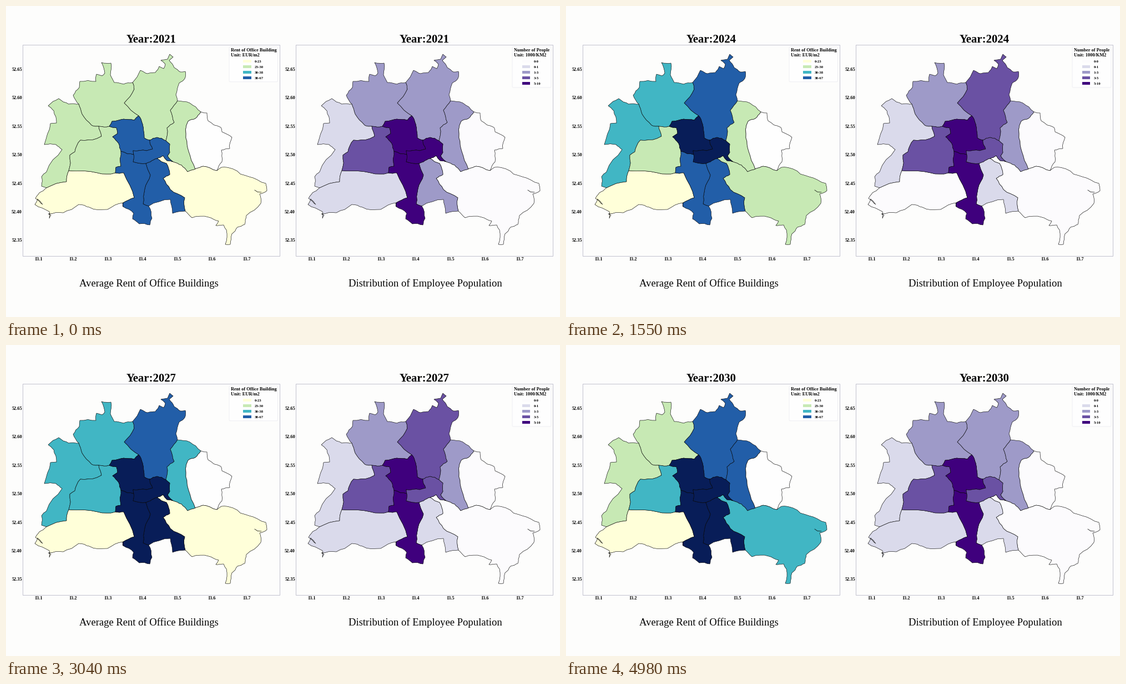
A matplotlib script for the animation above (5.01 s loop, 998 px wide and 561 px high).

```python
import random

import matplotlib.pyplot as plt
from matplotlib.animation import FuncAnimation
from matplotlib.patches import FancyBboxPatch, Polygon, Rectangle

W, H, DPI = 998, 561, 64
PT = 72 / DPI                      # points per pixel
FRAMES, INTERVAL = 167, 30
FIRST_YEAR, YEARS = 2021, 10
PAPER, BLANK = "#fdfdfc", "#fefefe"
RENT_COLORS = ["#ffffd9", "#c7e9b4", "#41b6c4", "#225ea8", "#081d58"]
JOB_COLORS = ["#fcfbfd", "#dadaeb", "#9e9ac8", "#6a51a3", "#3f007d"]

plt.rcParams["font.family"] = "Liberation Serif"
rng = random.Random(4)


def roughen(points, amount=0.08):
    """Push the middle of each longer segment a little to the side."""
    out = [points[0]]
    for (x0, y0), (x1, y1) in zip(points, points[1:]):
        dx, dy = x1 - x0, y1 - y0
        if dx * dx + dy * dy > 36:
            k = rng.uniform(-amount, amount)
            out.append(((x0 + x1) / 2 - k * dy, (y0 + y1) / 2 + k * dx))
        out.append((x1, y1))
    return out


def arc(start, end, *keys):
    """Natural-looking border between two junctions through a few key points."""
    return roughen(roughen([start, *keys, end]))


def ring(first, *arcs):
    """Join borders end to end, flipping them where needed."""
    points = list(first)
    for a in arcs:
        points += a if a[0] == points[-1] else a[::-1]
    return points


# Junctions, named by the areas that meet there
W_N, N_NE, NE_E, E_FE = (131, 177), (228, 138), (309, 171), (351, 191)
FE_SE, SE_SSE, SSE_S, S_SW, SW_W = (380, 297), (323, 370), (257, 361), (211, 362), (73, 328)
N_W_MW, N_MW_C, N_NE_C = (167, 217), (186, 217), (239, 198)
C_NE_ME, NE_E_ME, ME_E_SE = (259, 242), (288, 243), (301, 281)
E_FE_SE, ME_SE_SSE, ME_SSE_S = (341, 294), (272, 275), (252, 284)
ME_S_C, MW_S_C, MW_S_SW, MW_SW_W = (230, 268), (207, 262), (197, 301), (113, 297)

# Outer border, clockwise
n_out = arc(W_N, N_NE, (121, 161), (132, 147), (133, 136), (162, 136), (163, 123),
            (173, 126), (178, 121), (172, 102), (189, 103), (188, 124), (195, 138),
            (212, 141))
ne_out = arc(N_NE, NE_E, (242, 116), (255, 122), (269, 120), (276, 109), (284, 113),
             (287, 105), (279, 98), (291, 96), (295, 87), (301, 92), (294, 98),
             (303, 111), (314, 119), (323, 118), (322, 131), (312, 139), (306, 160))
e_out = arc(NE_E, E_FE, (331, 175))
fe_out = arc(E_FE, FE_SE, (362, 193), (364, 207), (387, 219), (389, 227), (407, 237),
             (403, 257), (388, 260), (389, 281))
se_out = arc(FE_SE, SE_SSE, (388, 291), (409, 294), (438, 308), (468, 320), (470, 333),
             (457, 339), (459, 356), (433, 378), (430, 394), (417, 399), (407, 411),
             (404, 430), (395, 430), (397, 404), (392, 395), (378, 396), (383, 388),
             (365, 381), (335, 382))
sse_out = arc(SE_SSE, SSE_S, (300, 374), (296, 349))
s_out = arc(SSE_S, S_SW, (263, 383), (259, 395), (240, 393), (228, 384), (230, 374))
sw_out = arc(S_SW, SW_W, (211, 355), (183, 367), (150, 363), (131, 358), (103, 373),
             (76, 375), (81, 377), (78, 383), (78, 371), (52, 358), (57, 348),
             (66, 358), (53, 347), (60, 337))
w_out = arc(SW_W, W_N, (64, 325), (64, 308), (73, 299), (101, 259), (90, 250),
            (69, 250), (80, 212), (91, 211), (86, 189), (76, 180), (95, 167),
            (113, 177))

# Inner borders
n_w = arc(W_N, N_W_MW, (137, 195), (154, 215))
n_mw = arc(N_W_MW, N_MW_C)
n_c = arc(N_MW_C, N_NE_C, (191, 208), (212, 204), (231, 206))
n_ne = arc(N_NE, N_NE_C, (231, 150), (213, 175))
ne_c = arc(N_NE_C, C_NE_ME, (246, 213), (249, 238))
ne_me = arc(C_NE_ME, NE_E_ME, (272, 237))
ne_e = arc(NE_E_ME, NE_E, (290, 220), (303, 210), (296, 188))
me_e = arc(NE_E_ME, ME_E_SE, (295, 249), (295, 264), (291, 270))
e_se = arc(ME_E_SE, E_FE_SE, (316, 287), (327, 299))
e_fe = arc(E_FE_SE, E_FE, (329, 262), (324, 238), (328, 208), (341, 203))
fe_se = arc(E_FE_SE, FE_SE, (355, 289))
me_se = arc(ME_SE_SSE, ME_E_SE, (283, 270), (290, 279))
sse_se = arc(ME_SE_SSE, SE_SSE, (289, 284), (295, 304), (283, 311), (296, 331),
             (322, 346))
me_sse = arc(ME_SE_SSE, ME_SSE_S, (260, 281))
s_sse = arc(ME_SSE_S, SSE_S, (260, 305), (250, 330), (247, 357))
s_me = arc(ME_SSE_S, ME_S_C, (229, 281))
me_c = arc(ME_S_C, C_NE_ME, (229, 261), (253, 261), (264, 258))
s_c = arc(ME_S_C, MW_S_C)
mw_c = arc(MW_S_C, N_MW_C, (203, 248), (192, 236), (201, 230), (199, 220))
mw_s = arc(MW_S_C, MW_S_SW, (207, 289), (198, 291))
sw_s = arc(MW_S_SW, S_SW, (212, 301), (231, 346), (211, 355))
mw_sw = arc(MW_SW_W, MW_S_SW, (165, 301))
sw_w = arc(MW_SW_W, SW_W, (109, 317))
mw_w = arc(MW_SW_W, N_W_MW, (115, 269), (124, 263), (134, 242), (164, 239), (172, 235))

# Outline, then rent and job levels as {first year: level}
AREAS = [
    (ring(n_out, n_ne, n_c, n_mw, n_w), {2021: 1, 2023: 2, 2028: 1}, {2021: 2}),
    (ring(w_out, n_w, mw_w, sw_w), {2021: 1, 2022: 3, 2023: 2, 2028: 1},
     {2021: 1, 2023: 0, 2024: 1}),
    (ring(ne_out, ne_e, ne_me, ne_c, n_ne), {2021: 1, 2022: 2, 2024: 3},
     {2021: 2, 2022: 3, 2030: 2}),
    (ring(e_out, e_fe, e_se, me_e, ne_e), {2021: 1, 2022: 0, 2023: 1, 2026: 2, 2030: 3},
     {2021: 2, 2022: 1, 2023: 2}),
    (ring(fe_out, fe_se, e_fe), {}, {2021: 0}),
    (ring(se_out, sse_se, me_se, e_se, fe_se), {2021: 0, 2023: 1, 2026: 0, 2028: 2},
     {2021: 0}),
    (ring(sw_out, sw_w, mw_sw, sw_s), {2021: 0}, {2021: 1, 2023: 0, 2026: 1}),
    (ring(mw_sw, mw_s, mw_c, n_mw, mw_w), {2021: 1, 2026: 2}, {2021: 3, 2029: 4, 2030: 3}),
    (ring(sse_out, s_sse, me_sse, sse_se), {2021: 3, 2027: 4}, {2021: 2, 2024: 1}),
    (ring(s_out, sw_s, mw_s, s_c, s_me, s_sse), {2021: 3, 2027: 4},
     {2021: 4, 2025: 3, 2027: 4}),
    (ring(n_c, ne_c, me_c, s_c, mw_c), {2021: 3, 2024: 4}, {2021: 4}),
    (ring(ne_me, me_e, me_se, me_sse, s_me, me_c), {2021: 3, 2022: 4}, {2021: 4, 2024: 3}),
]

fig = plt.figure(figsize=(W / DPI, H / DPI), dpi=DPI, facecolor=PAPER)
ax = fig.add_axes([0, 0, 1, 1])
ax.set(xlim=(0, W), ylim=(H, 0))
ax.axis("off")


def label(x, y, text, size, ha="left", weight="bold"):
    return ax.text(x, y, text, fontsize=size * PT, ha=ha, va="baseline", weight=weight,
                   color="black")


def legend(x, width, swatch_x, title, unit, colors, names):
    height = 22.5 + 10.2 * len(names)
    ax.add_patch(FancyBboxPatch((x, 73.5), width, height, fc=BLANK, ec="#ececf0",
                                lw=0.8 * PT, boxstyle="round,pad=0,rounding_size=2"))
    label(x + 3, 82.3, title, 8.2)
    label(x + 3, 91, unit, 8.2)
    for i, (color, name) in enumerate(zip(colors, names)):
        y = 99.4 + 10.1 * i
        ax.add_patch(Rectangle((swatch_x, y - 2.5), 14.5, 5, fc=color, lw=0))
        label(swatch_x + 20.8, y + 2.3, name, 6.9)


def panel(dx, caption, caption_x):
    """Frame, ticks, caption and areas of one map; returns title and area patches."""
    ax.add_patch(Rectangle((30 + dx, 70), 463, 381, fc=PAPER, ec="#b4b4c4",
                           lw=0.8 * PT))
    for i in range(7):
        label(58.2 + dx + 62.55 * i, 459, f"{13.1 + 0.1 * i:.1f}", 8.2, "center")
        label(28.9 + dx, 116.9 + 51.4 * i, f"{52.65 - 0.05 * i:.2f}", 8.2, "right")
    label(caption_x, 506, caption, 18.65, "center", weight="normal")
    patches = []
    for outline, _, _ in AREAS:
        shape = Polygon([(x + dx, y) for x, y in outline], closed=True, fc="none",
                        ec="black", lw=0.6 * PT, joinstyle="round")
        patches.append(ax.add_patch(shape))
    ax.plot([448 + dx, 453 + dx, 460 + dx], [332, 335.5, 336], color="black",
            lw=0.7 * PT)
    return label(261.5 + dx, 66, "", 20.8, "center"), patches


rent_title, rent_areas = panel(0, "Average Rent of Office Buildings", 257)
job_title, job_areas = panel(492, "Distribution of Employee Population", 755)
legend(402, 87.5, 427.3, "Rent of Office Building", "Unit: EUR/m2", RENT_COLORS,
       ["0-23", "23-30", "30-38", "38-67"])
legend(912, 70, 930, "Number of People", "Unit: 1000/KM2", JOB_COLORS,
       ["0-0", "0-1", "1-3", "3-5", "5-10"])


def color_in(history, year, colors):
    """Colour of the latest level that has started by this year."""
    started = [y for y in history if y <= year]
    return colors[history[max(started)]] if started else BLANK


def update(frame):
    year = FIRST_YEAR + int((frame + 0.35) * YEARS / FRAMES)
    for title in (rent_title, job_title):
        title.set_text(f"Year:{year}")
    for (_, rent, jobs), left, right in zip(AREAS, rent_areas, job_areas):
        left.set_facecolor(color_in(rent, year, RENT_COLORS))
        right.set_facecolor(color_in(jobs, year, JOB_COLORS))
    return [rent_title, job_title, *rent_areas, *job_areas]


anim = FuncAnimation(fig, update, frames=FRAMES, interval=INTERVAL, repeat=True,
                     repeat_delay=0, blit=False)
plt.show()
```
